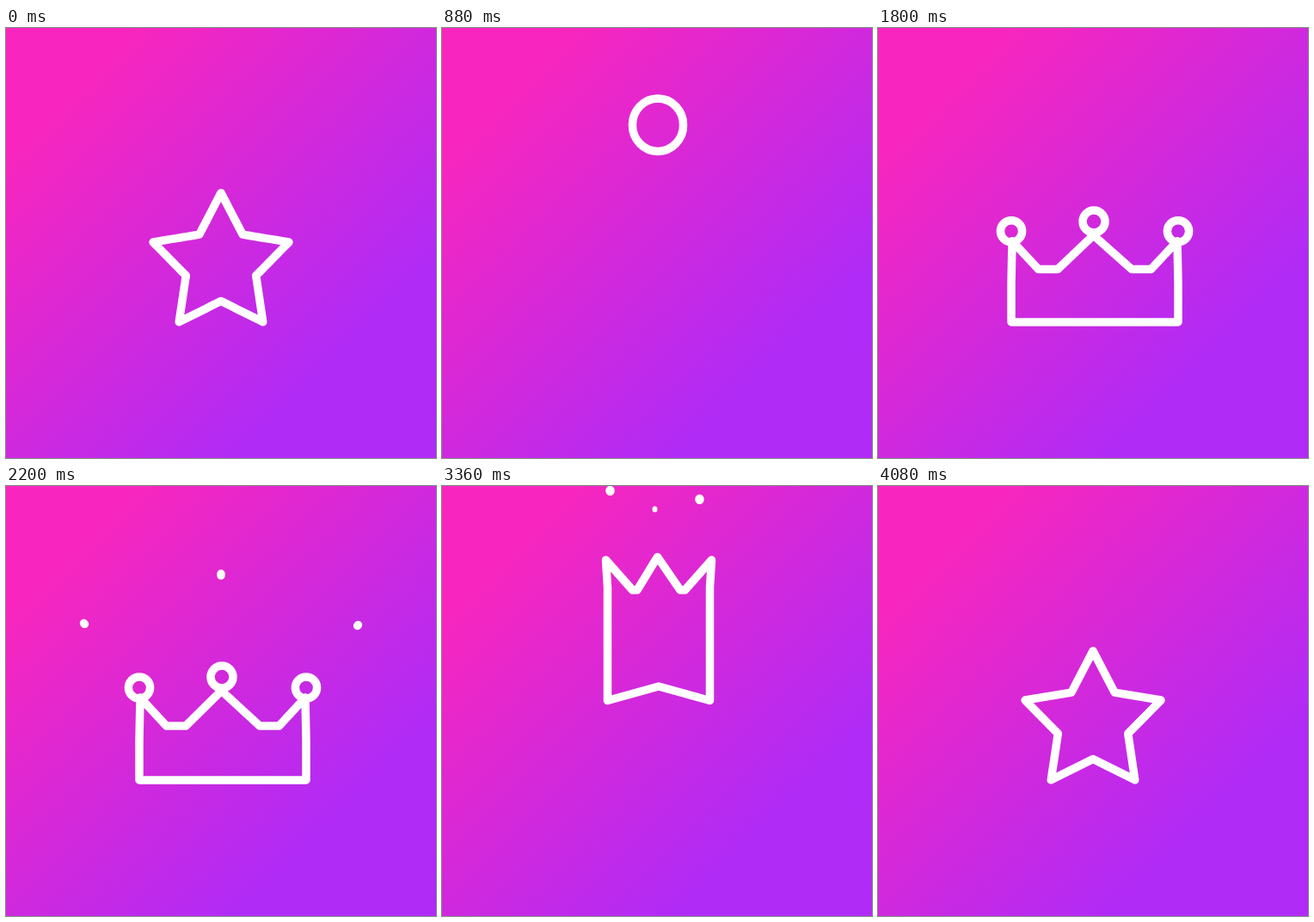
These frames come from a looping animation (500 by 500 pixels, 5.16 s). An HTML page with a canvas:

```html
<!DOCTYPE html>
<html lang="en">
<head>
<meta charset="utf-8">
<title>Star and crown</title>
<style>
  html, body { margin: 0; width: 100%; height: 100%; overflow: hidden; background: #d528da; }
  canvas { display: block; width: 100%; height: 100%; }
</style>
</head>
<body>
<canvas id="stage" width="500" height="500"></canvas>
<script>
const ctx = document.getElementById('stage').getContext('2d');
const LOOP = 5160, STEP = 40, GROUND = 342, LINE = 9.5;
const MID = 250, CROWN_X = 252, RING = 12.6;
const SIDES = [-1, 0, 1], TIPS = [2, 5, 8];

const linear = x => x;
const inQuad = x => x * x;
const inCubic = x => x ** 3;
const outQuad = x => 1 - (1 - x) ** 2;
const outCubic = x => 1 - (1 - x) ** 3;
const fall = x => x ** 3.5;
const inOut = x => x < .5 ? 4 * x ** 3 : 1 - (2 - 2 * x) ** 3 / 2;
const smooth = x => x * x * (3 - 2 * x);

const lerp = (a, b, k) => a + (b - a) * k;
const between = (p, q, k) => [lerp(p[0], q[0], k), lerp(p[1], q[1], k)];
const mix = (a, b, k) => a.map((p, i) => between(p, b[i], k));
const span = (t, a, b, ease = linear) => ease(Math.min(1, Math.max(0, (t - a) / (b - a))));

// Keys are [time, value, easing towards this key].
function track(t, keys) {
  let v = keys[0][1];
  for (let i = 1; i < keys.length && t > keys[i - 1][0]; i++)
    v = lerp(keys[i - 1][1], keys[i][1], span(t, keys[i - 1][0], keys[i][0], keys[i][2] || smooth));
  return v;
}

// Mirrors a half outline: foot, side, tip, outer and inner valley, as [distance, y].
function outline(x, half, peak, base) {
  const left = half.map(([d, y]) => [x - d, y]);
  const right = half.map(([d, y]) => [x + d, y]).reverse();
  return [...left, peak, ...right, base];
}

function star() {
  const polar = k => {
    const a = k * Math.PI / 5, r = k % 2 ? 83 : 42.8;
    return [r * Math.sin(a), 274.7 + r * Math.cos(a)];
  };
  return outline(MID, [1, 2, 3, 4, 4].map(polar), [MID, polar(5)[1]], [MID, polar(0)[1]]);
}

function crown({ foot, tip, outer, inner, tipY, sideY, valleyY, peakY, footY = GROUND, baseY = footY }) {
  const half = [[foot, footY], [foot, sideY], [tip, tipY], [outer, valleyY], [inner, valleyY]];
  return outline(CROWN_X, half, [CROWN_X - 1.5, peakY], [CROWN_X, baseY]);
}

const STAR = star();
const CROWN = crown({ foot: 97, tip: 96, outer: 65.5, inner: 43,
                      tipY: 246, sideY: 296, valleyY: 279, peakY: 238 });
const CROUCH = crown({ foot: 103, tip: 102, outer: 72.5, inner: 49,
                       tipY: 251, sideY: 300, valleyY: 292.5, peakY: 254.5 });
const LEAP = crown({ foot: 59.5, tip: 61.5, outer: 30.5, inner: 25, tipY: 86, sideY: 118,
                     valleyY: 121, peakY: 82.5, footY: 249.5, baseY: 233 });

function trace(points, closed) {
  ctx.beginPath();
  points.forEach(p => ctx.lineTo(p[0], p[1]));
  if (closed) ctx.closePath();
  ctx.stroke();
}

function ring(x, y, rx, ry = rx) {
  ctx.beginPath();
  ctx.ellipse(x, y, rx, ry, 0, 0, Math.PI * 2);
  ctx.stroke();
}

// Keeps the feet on the ground while the width answers the height.
const squash = (points, sy, dy) => points.map(([x, y]) =>
  [MID + (x - MID) * (1 + (1 - sy) / 2), GROUND + (y - GROUND) * sy + dy]);

function background() {
  const g = ctx.createLinearGradient(75, 75, 385, 385);
  g.addColorStop(0, '#f826be');
  g.addColorStop(1, '#b02bf6');
  ctx.fillStyle = g;
  ctx.fillRect(0, 0, 500, 500);
}

function starToRing(t) {
  const y = track(t, [[280, 277], [740, 107, outCubic]]);
  const sy = track(t, [[0, 1], [240, .78], [340, 1.12], [480, 1]]);
  const round = span(t, 340, 540, smooth);
  const body = squash(STAR, sy, y - 277);
  const points = body.flatMap((p, i) => {
    const next = body[(i + 1) % body.length];
    return Array.from({ length: 8 }, (_, j) => {
      const q = between(p, next, j / 8), a = Math.atan2(q[1] - y, q[0] - MID);
      return between(q, [MID + 1 + 30 * Math.cos(a), y + 30 * Math.sin(a)], round);
    });
  });
  trace(points, true);
}

function fallingRing(t) {
  const y = track(t, [[560, 117], [740, 107, outCubic], [1130, 312, fall]]);
  const stretch = span(t, 760, 1130, inQuad) * 4;
  ring(MID + 1, y, 30 - stretch, 30.3 + stretch);
}

function buildCrown(t) {
  const bounce = (top, low, rest) =>
    track(t, [[1130, 312], [1480, top, outCubic], [1760, low], [1880, rest]]);
  const midY = bounce(181.5, 226, 222), sideY = bounce(204.5, 237, 234.5);
  const spread = span(t, 1130, 1400, outCubic) * 97;
  const scale = (GROUND - midY) / 120;
  const shape = CROWN.map(([x, y]) => [x, GROUND + (y - GROUND) * scale]);
  shape[2][1] = shape[8][1] = sideY + 11.5;
  shape[5][1] = midY + 16;

  // Both halves are drawn on from the middle of the base.
  const drawn = span(t, 1160, 1800, inOut);
  if (drawn === 1) trace(shape, true);
  else if (drawn > 0) {
    ctx.setLineDash([drawn * 318, 2000]);
    trace([shape[11], ...shape.slice(0, 6)]);
    trace([shape[11], ...shape.slice(5, 11).reverse()]);
    ctx.setLineDash([]);
  }
  ring(MID + 1, midY, track(t, [[1130, 30], [1320, 13]]));
  ring(CROWN_X - spread, sideY, RING);
  ring(CROWN_X + spread, sideY, RING);
}

function sparks(t) {
  if (t < 1880) return;
  const head = span(t, 1860, 2200, outCubic), tail = span(t, 1920, 2250, outQuad);
  SIDES.forEach(s => {
    const from = [MID + 119 * s, s ? 207 : 192], to = [MID + 159.5 * s, s ? 160.5 + s : 102];
    trace([between(from, to, tail), between(from, to, head)]);
  });
}

function leapingCrown(t) {
  const crouch = span(t, 2540, 2840, smooth);
  const jump = span(t, 2900, 3360, outCubic);
  const shape = mix(mix(CROWN, CROUCH, crouch), LEAP, jump);
  trace(shape, true);

  // The rings let go of the tips and shrink as they fly on.
  const away = span(t, 3080, 3360), shrink = span(t, 3080, 3360, inQuad);
  SIDES.forEach((s, i) => {
    const [x, y] = shape[TIPS[i]];
    const from = [x, y - (s ? 11.5 : 16)], to = [247.5 + 52 * s, s ? 10.5 + 5 * s : 27];
    ctx.lineWidth = lerp(LINE, s ? 8.5 : 4, shrink);
    ring(...between(from, to, away), lerp(RING, 1, shrink), lerp(RING, 1.5, shrink));
  });
}

function landingStar(t) {
  const morph = span(t, 3360, 3580, smooth);
  const dy = track(t, [[3400, -100], [3640, 0, inCubic]]);
  const sy = track(t, [[3560, 1], [3640, 1.06], [3720, .84], [3820, 1.05], [3920, 1]]);
  trace(mix(LEAP, squash(STAR, sy, dy), morph), true);
}

function draw(t) {
  background();
  ctx.strokeStyle = '#fff';
  ctx.lineWidth = LINE;
  ctx.lineCap = ctx.lineJoin = 'round';
  if (t < 560) starToRing(t);
  else if (t < 1130) fallingRing(t);
  else if (t < 2280) { buildCrown(t); sparks(t); }
  else if (t <= 3360) leapingCrown(t);
  else landingStar(t);
}

const start = performance.now();
function tick() {
  const t = (performance.now() - start) % LOOP;
  draw(Math.floor(t / STEP) * STEP);
  requestAnimationFrame(tick);
}
tick();
</script>
</body>
</html>
```
